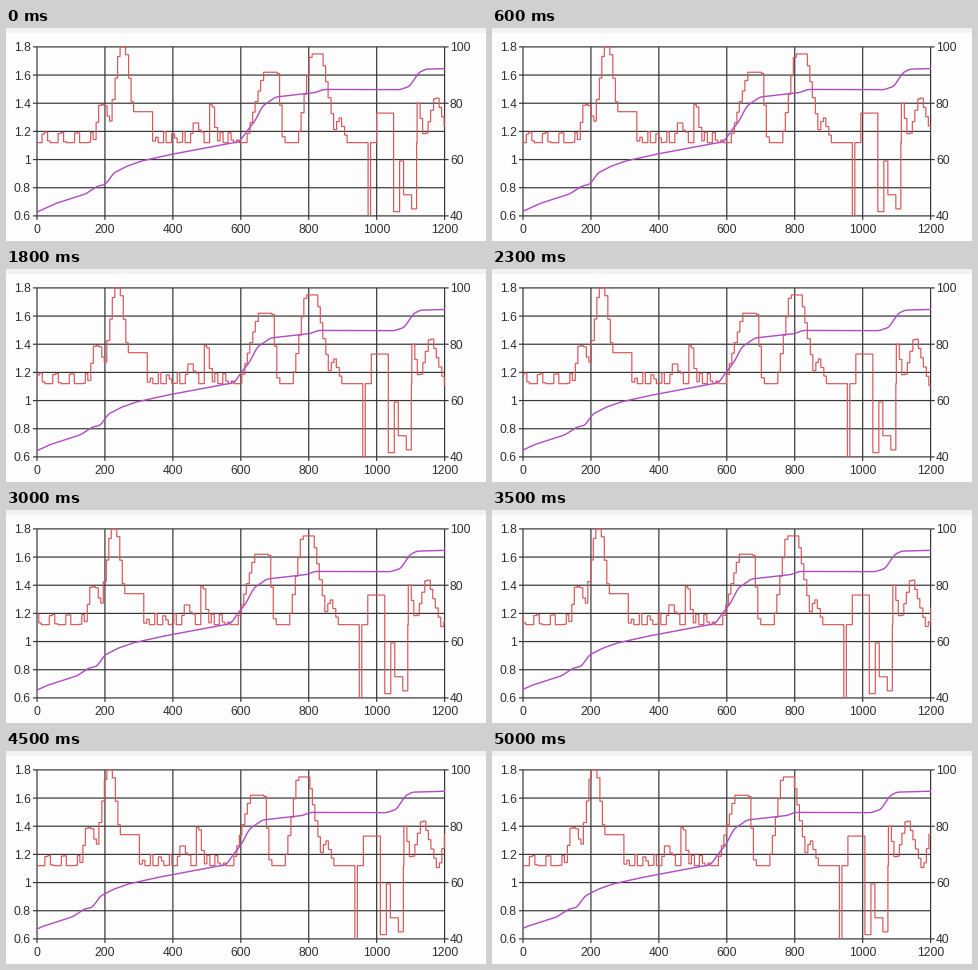
Recreate the animation shown at these times as a matplotlib script. Size 480x213 px, loop 5.1 s.

```python
import numpy as np
import matplotlib.pyplot as plt
from matplotlib.animation import FuncAnimation
from matplotlib.patches import Rectangle

W, H, DPI = 480, 213, 100
FRAMES, INTERVAL = 51, 100
LEFT, RIGHT, TOP, BOTTOM = 31, 438.6, 18.9, 187.9
SCROLL = 0.294  # pixels per frame
PX = 72 / DPI   # one pixel in points

GRID, TEXT = "#363636", "#303030"
RED, PURPLE = "#d6585c", "#ae4cc0"

# Hills of the stepped trace: foot, top start, top end, foot, height.
HILLS = [
    (87, 93, 98, 108, 1.39), (101, 113, 119, 130, 1.8),
    (120, 124, 145, 147, 1.34), (185, 187, 191, 196, 1.26),
    (201, 203, 206, 211, 1.39), (239, 257, 271, 277, 1.62),
    (291, 304, 315, 330, 1.75), (328, 331, 333, 341, 1.3),
]
# Hard blocks near the end: start, end, level.
BLOCKS = [
    (362.5, 365, 0.5), (371, 388, 1.33), (388, 394, 0.63),
    (394, 398, 0.99), (398, 406, 0.75), (406, 411, 0.65),
]
# Turning points of the newest zigzag.
ZIGZAG = [(411, 1.42), (418, 1.14), (429, 1.47), (445, 1.08), (453, 1.38)]

# Bends of the slow curve, on the right-hand scale.
BENDS = [
    (20, 39.5), (50, 44.4), (80, 47.8), (92, 50.6), (100, 51.2), (108, 55.2),
    (121, 57.6), (136, 59.5), (165, 61.8), (234, 66.4), (241, 70), (249, 73.5),
    (257, 79), (270, 82.2), (310, 83.8), (318, 84.9), (394, 84.8), (404, 86),
    (413, 90.8), (420, 92.1), (460, 92.5),
]


def to_y(value, low, high):
    return BOTTOM - (value - low) / (high - low) * (BOTTOM - TOP)


def ripple(x, start, end, crest, period):
    wave = 0.08 * np.cos(2 * np.pi * (x - crest) / period)
    return np.where((x > start) & (x < end), wave, 0)


def stepped_trace():
    """Sample a smooth profile coarsely, then cut in the hard blocks."""
    cell = np.arange(20, 470, 2.7)
    level = 1.12 + ripple(cell, 0, 87, 54, 16) + ripple(cell, 147, 231, 148, 9.4)
    for a, b, c, d, top in HILLS:
        hill = np.interp(cell, [a, b, c, d], [1.12, top, top, 1.12])
        level = np.maximum(level, hill)
    level = np.where(cell > 410, np.interp(cell, *zip(*ZIGZAG)), level)

    x = np.arange(20, 470, 0.5)
    value = level[((x - 20) / 2.7).astype(int)]
    for a, b, block in BLOCKS:
        value[(x >= a) & (x < b)] = block
    return x, to_y(value, 0.6, 1.8)


def slow_curve():
    x = np.arange(20, 460)
    value = np.interp(x, *zip(*BENDS))
    smooth = np.convolve(value, np.ones(5) / 5, mode="valid")
    return x[2:-2], to_y(smooth, 40, 100)


def rule(x, y):
    ax.plot(x, y, color=GRID, lw=1.2 * PX, solid_capstyle="butt",
            snap=False, zorder=1)


def label(x, y, text, ha):
    ax.text(x, y, text, ha=ha, va="center_baseline", color=TEXT,
            family="Liberation Sans", size=12.1 * PX)


fig = plt.figure(figsize=(W / DPI, H / DPI), dpi=DPI, facecolor="#fdfdfd")
ax = fig.add_axes([0, 0, 1, 1])
ax.set(xlim=(0, W), ylim=(H, 0))
ax.axis("off")
ax.add_patch(Rectangle((0, 0), W, 5, color="#f2f2f2", lw=0))

for i, x in enumerate(np.linspace(LEFT, RIGHT, 7)):
    rule([x, x], [TOP, BOTTOM + 4])
    label(x, 200.3, str(200 * i), "center")
for i, y in enumerate(np.linspace(TOP, BOTTOM, 7)):
    rule([LEFT - 4, RIGHT], [y, y])
    label(25, y, f"{1.8 - 0.2 * i:.1f}".replace("1.0", "1"), "right")
for i, y in enumerate(np.linspace(TOP, BOTTOM, 4)):
    rule([RIGHT, RIGHT + 4], [y, y])
    label(444, y, str(100 - 20 * i), "left")

clip = Rectangle((LEFT - 0.5, TOP - 0.5), RIGHT - LEFT + 0.5,
                 BOTTOM - TOP + 0.5, transform=ax.transData)
red_x, red_y = stepped_trace()
curve_x, curve_y = slow_curve()
red, = ax.plot(red_x, red_y, color=RED, lw=1.2 * PX, drawstyle="steps-post",
               solid_joinstyle="miter", snap=False, zorder=2)
purple, = ax.plot(curve_x, curve_y, color=PURPLE, lw=1.4 * PX,
                  snap=False, zorder=3)
for line in (red, purple):
    line.set_clip_path(clip)


def draw(frame):
    shift = -0.4 - SCROLL * frame
    red.set_xdata(red_x + shift)
    purple.set_xdata(curve_x + shift)
    return red, purple


anim = FuncAnimation(fig, draw, frames=FRAMES, interval=INTERVAL,
                     repeat=True, repeat_delay=0)
plt.show()
```
